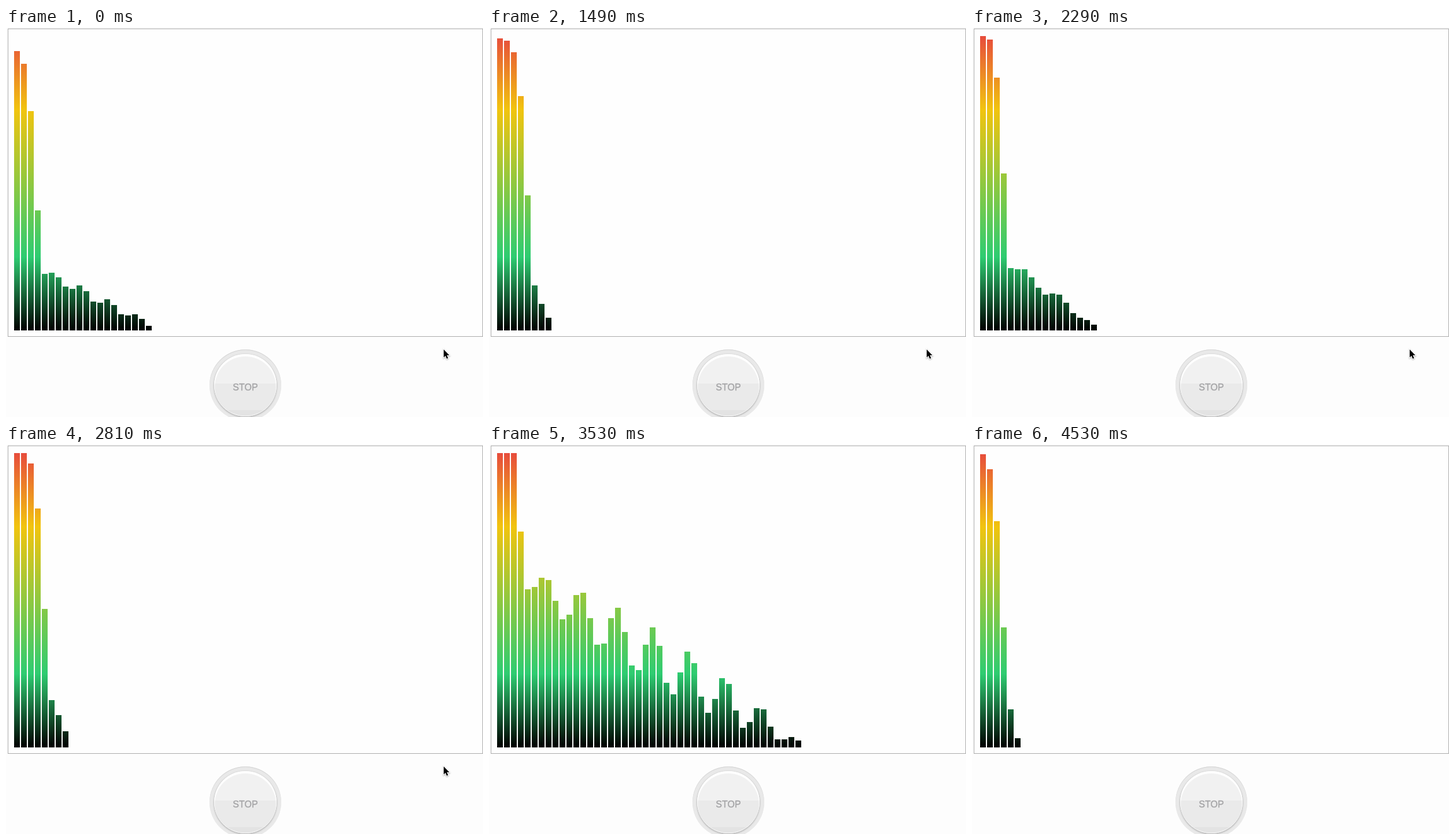
Recreate the animation shown at these times as an HTML page with a canvas. Size 825 px wide and 674 px high, loop 4.58 s.

```html
<!DOCTYPE html>
<html lang="en">
<head>
<meta charset="utf-8">
<title>Spectrum</title>
<style>
  html, body { margin: 0; width: 100%; height: 100%; overflow: hidden; background: #fdfdfd; }
  .stage { position: relative; width: 825px; height: 674px; overflow: hidden; }
  .stage > * { position: absolute; box-sizing: border-box; }
  .panel { left: 3px; top: 1px; width: 822px; height: 534px; border: 1px solid #aaa; background: #fefefe; }
  canvas { left: 14px; top: 14px; }
  .well {
    left: 352px; top: 557px; width: 124px; height: 124px; border-radius: 50%;
    background: #e9e9e9; box-shadow: inset 0 1px 1px #d2d2d2;
  }
  .knob {
    left: 360px; top: 565px; width: 108px; height: 108px; border-radius: 50%;
    background: linear-gradient(#f1f1f1 51px, #eaeaea 51px 97px, #e3e3e3 97px);
    box-shadow: 0 1px 3px rgba(0, 0, 0, .35), inset 0 3px 1px 1px #fff, inset 0 -2px 1px -1px #f8f8f8;
  }
  svg { left: 0; top: 0; }
  text {
    font: 16px "Liberation Sans", Arial, sans-serif; text-anchor: middle;
    fill: #a4a4a6; stroke: #a4a4a6; stroke-width: .4px;
  }
  #cursor { paint-order: stroke; filter: drop-shadow(0 1px 1px rgba(0, 0, 0, .35)); }
</style>
</head>
<body>
<div class="stage">
  <div class="panel"></div>
  <canvas id="bars" width="766" height="510"></canvas>
  <div class="well"></div>
  <div class="knob"></div>
  <svg width="825" height="674">
    <text x="414" y="628">STOP</text>
    <path id="cursor" d="M0 0V13.7L3.1 10.9L5.3 15.9L7.6 14.9L5.5 10H9.8Z" fill="#000" stroke="#fff" stroke-width="2"/>
  </svg>
</div>
<script>
const LOOP = 4580, COUNT = 64, PITCH = 12, WIDTH = 10, HEIGHT = 510, REFRESH = 64;

// Each pose is a bass shelf (peak, edge) with a rippled treble slope (tail, reach, wave).
const poses = [
  { at: 0, peak: 490, edge: 2.8, tail: 100, reach: 21, wave: 4 },
  { at: 650, peak: 475, edge: 3.45, tail: 60, reach: 7 },
  { at: 1490, peak: 507, edge: 3.9, tail: 90, reach: 8 },
  { at: 2290, peak: 525, edge: 3.05, tail: 115, reach: 17, wave: 4.9 },
  { at: 2810, peak: 518, edge: 3.9, tail: 110, reach: 8 },
  { at: 3530, peak: 575, edge: 3.4, tail: 290, reach: 44, wave: 5.2 },
  { at: 4530, peak: 515, edge: 2.75, tail: 0, reach: 6 }
];
poses.push({ ...poses[0], at: LOOP });

// Drum hits: time and loudness of the lowest bar.
const hits = [[300, 470], [940, 270], [1625, 470], [2530, 235], [2930, 470], [3400, 460], [4140, 470]];

const clamp = (v, lo, hi) => Math.max(lo, Math.min(hi, v));
const ctx = document.getElementById('bars').getContext('2d');
const cursor = document.getElementById('cursor');
const paint = ctx.createLinearGradient(0, 0, 0, HEIGHT);
[[0, '#e74c3c'], [.25, '#f1c40f'], [.75, '#2ecc71'], [1, '#000']].forEach(s => paint.addColorStop(...s));

function shape({ peak, edge, tail, reach, wave }, i) {
  const shelf = peak / (1 + Math.exp((i - edge) / .65));
  const ripple = wave ? .014 * i * Math.cos(2 * Math.PI * (i - 1.3) / wave) : 0;
  const slope = i < 4 ? 0 : tail * (reach - i) / (reach - 4) * (1 + ripple);
  const h = Math.max(shelf, slope);
  return h < 6 ? 0 : Math.min(h, HEIGHT);
}

function level(a, b, u, i, t) {
  const free = Math.min(1, 8 * u * (1 - u));
  const s = Math.min(1, 1.6 * u), mix = s * s * (3 - 2 * s);
  let h = shape(a, i) * (1 - mix) + shape(b, i) * mix;
  if (h > 1) h += free * 14 * Math.sin(i * 1.7 + t * .017);

  const ripple = 20 * Math.sin(i * 1.1 + t * .02) + 14 * Math.sin(i * 2.3 - t * .013);
  for (const [at, loud] of hits) {
    if (t >= at) h = Math.max(h, free * (loud - 6 * i - .9 * (t - at) + ripple));
  }
  return clamp(2 * Math.round(h / 2), 0, HEIGHT);
}

function drawCursor(t) {
  const p = clamp((t - 3150) / 260, 0, 1), e = 1 - (1 - p) ** 2;
  cursor.setAttribute('transform', `translate(${757 + 18 * e} ${557 + 97 * e})`);
  cursor.style.display = t < 3500 ? '' : 'none';
}

function draw(now) {
  const k = poses.findLastIndex(p => p.at <= now);
  const a = poses[k], b = poses[k + 1], gap = b.at - a.at;
  const n = Math.round(gap / REFRESH);
  const u = Math.floor((now - a.at) / gap * n) / n;
  const t = a.at + gap * u;

  ctx.clearRect(0, 0, 766, HEIGHT);
  ctx.fillStyle = paint;
  for (let i = 0; i < COUNT; i++) {
    const h = level(a, b, u, i, t);
    ctx.fillRect(i * PITCH, HEIGHT - h, WIDTH, h);
  }
  drawCursor(t);
}

const start = performance.now();
function step() {
  draw(Math.max(0, performance.now() - start) % LOOP);
  requestAnimationFrame(step);
}
step();
</script>
</body>
</html>
```
